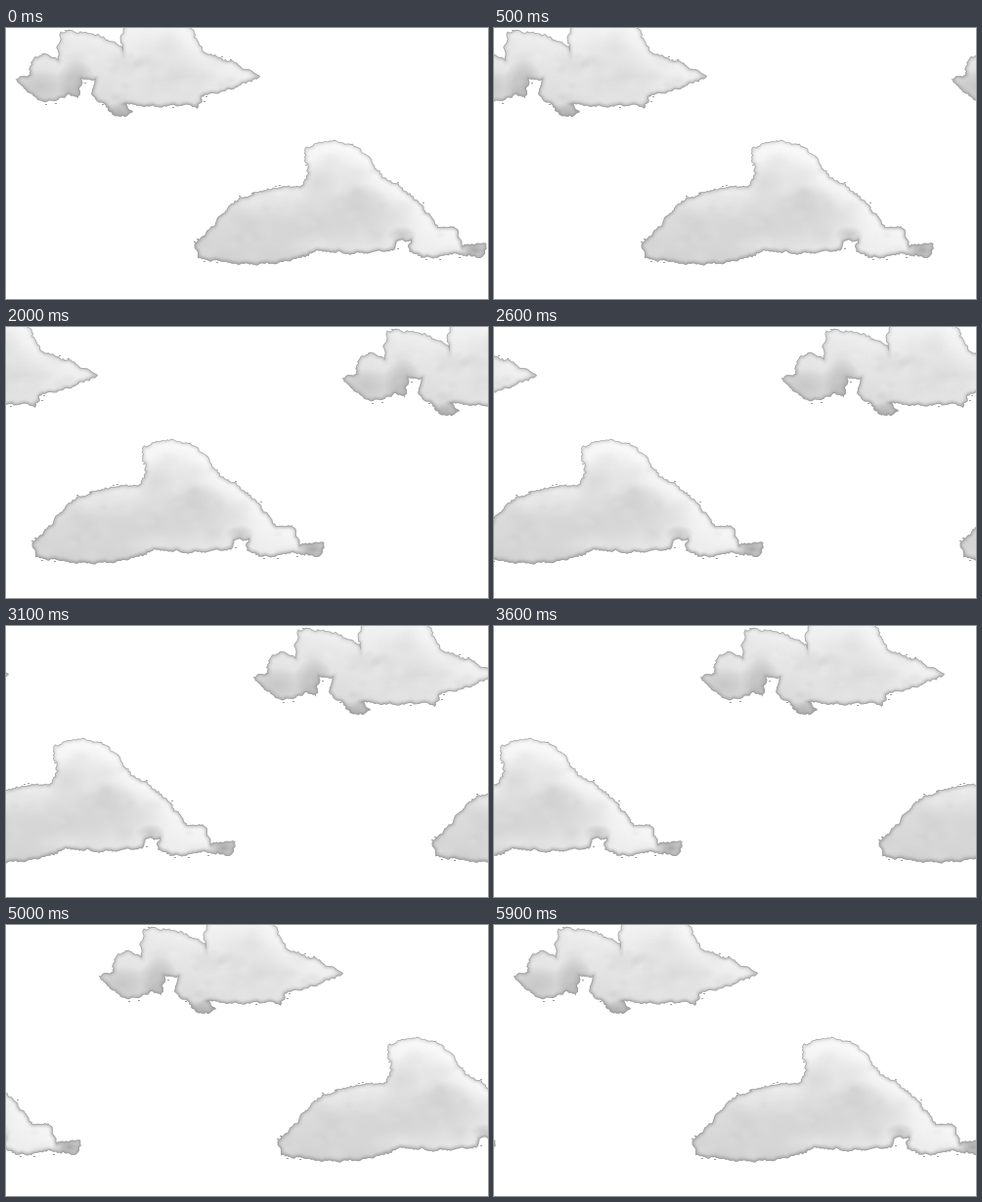
An HTML page with a canvas that plays this animation: 493x278 px, repeating every 6 s.

```html
<!DOCTYPE html>
<html lang="en">
<head>
<meta charset="utf-8">
<title>Drifting clouds</title>
<style>
  html, body { margin: 0; width: 100%; height: 100%; overflow: hidden; background: #fff; }
  canvas { display: block; }
</style>
</head>
<body>
<canvas id="stage" width="493" height="278"></canvas>
<script>
const STEP_MS = 100, STEPS = 60, STEP_PX = 8.3, PERIOD = 500;

let seed = 7;
const random = () => (seed = (seed * 16807) % 2147483647) / 2147483647;
const between = (a, b) => a + (b - a) * random();
const grey = (tone, alpha = 1) => `rgba(${tone},${tone},${tone},${alpha})`;

const sky = document.createElement('canvas');
sky.width = PERIOD;
sky.height = 250;
const pen = sky.getContext('2d');

// Turns a few clockwise corners into a bulging, ragged outline with loose wisps.
function raggedPath(corners) {
  const edge = new Path2D();
  const wisps = new Path2D();
  corners.forEach(([x, y], i) => {
    const [nx, ny] = corners[(i + 1) % corners.length];
    const dx = nx - x, dy = ny - y, length = Math.hypot(dx, dy);
    const parts = Math.ceil(length / 2);
    const phase = random() * 6;
    for (let k = 0; k < parts; k++) {
      const f = k / parts;
      const swell = Math.sin(Math.PI * f);
      const out = swell * (length * 0.04 + Math.sin(f * length / 3 + phase)) + between(-1, 1);
      const px = x + dx * f + dy / length * out;
      const py = y + dy * f - dx / length * out;
      edge.lineTo(px, py);
      if (random() < 0.03) {
        wisps.rect(Math.round(px + dy / length * 2), Math.round(py - dx / length * 2), 2, 1);
      }
    }
  });
  edge.closePath();
  edge.addPath(wisps);
  return edge;
}

function puff(x, y, rx, ry, tone, alpha) {
  pen.save();
  pen.translate(x, y);
  pen.scale(rx, ry);
  const glow = pen.createRadialGradient(0, 0, 0, 0, 0, 1);
  glow.addColorStop(0, grey(tone, alpha));
  glow.addColorStop(0.5, grey(tone, alpha * 0.6));
  glow.addColorStop(1, grey(tone, 0));
  pen.fillStyle = glow;
  pen.fillRect(-1, -1, 2, 2);
  pen.restore();
}

function drawCloud({ outline, light, dark, shine, shades }) {
  const corners = outline.split(' ').map(pair => pair.split(',').map(Number));
  const xs = corners.map(p => p[0]), ys = corners.map(p => p[1]);
  const left = Math.min(...xs), right = Math.max(...xs);
  const top = Math.min(...ys), bottom = Math.max(...ys);
  const path = raggedPath(corners);

  const fade = (from, to, slant = 0) => {
    const middle = (left + right) / 2;
    const gradient = pen.createLinearGradient(middle + slant, top, middle - slant, bottom);
    gradient.addColorStop(0, from);
    gradient.addColorStop(1, to);
    return gradient;
  };
  const outlineStroke = (style, width, blur) => {
    pen.filter = blur ? `blur(${blur}px)` : 'none';
    pen.strokeStyle = style;
    pen.lineWidth = width;
    pen.stroke(path);
    pen.filter = 'none';
  };

  pen.save();
  pen.clip(path);
  pen.fillStyle = fade(grey(light), grey(dark));
  pen.fillRect(left - 5, top - 5, right - left + 10, bottom - top + 10);
  outlineStroke(fade(grey(255, shine), grey(255, 0), 60), 30, 8);
  shades.forEach(shade => puff(...shade));
  for (let i = 0; i < 120; i++) {
    const r = between(4, 13);
    puff(between(left, right), between(top, bottom), r * 1.4, r, random() < 0.6 ? 255 : 175, 0.1);
  }
  outlineStroke(fade(grey(165, 0.35), grey(155, 0.8)), 4, 1.5);
  outlineStroke(grey(150, 0.7), 1.6, 0);
  pen.restore();
}

drawCloud({
  outline: '10,53 25,48 26,34 37,26 53,32 56,4 82,4 120,20 117,8 124,-6 184,-6 ' +
    '202,25 260,50 200,70 196,82 186,78 122,78 130,86 112,91 102,79 88,69 ' +
    '91,53 78,52 74,72 64,67 52,75 38,75 23,66',
  light: 238, dark: 212, shine: 0.5,
  shades: [
    [72, 56, 20, 24, 165, 0.7],
    [34, 60, 28, 18, 185, 0.6],
    [130, 38, 34, 14, 212, 0.5],
    [116, 86, 20, 9, 165, 0.8]
  ]
});

drawCloud({
  outline: '193,222 212,203 234,178 262,167 303,162 309,149 306,123 333,115 360,122 ' +
    '385,152 416,173 442,204 460,205 467,223 491,221 487,235 460,231 425,235 ' +
    '412,229 414,218 401,218 396,228 318,228 285,240 225,240 197,236',
  light: 238, dark: 210, shine: 0.9,
  shades: [
    [318, 158, 22, 24, 200, 0.5],
    [356, 182, 38, 24, 200, 0.6],
    [300, 204, 90, 18, 208, 0.5],
    [405, 212, 16, 9, 180, 0.6],
    [480, 228, 18, 11, 160, 0.9]
  ]
});

const view = document.getElementById('stage').getContext('2d');

function render() {
  const step = Math.floor(performance.now() / STEP_MS) % STEPS;
  const shift = Math.round(step * STEP_PX);
  view.fillStyle = '#fff';
  view.fillRect(0, 0, 493, 278);
  view.drawImage(sky, -shift, 0);
  view.drawImage(sky, PERIOD - shift, 0);
  requestAnimationFrame(render);
}
render();
</script>
</body>
</html>
```
